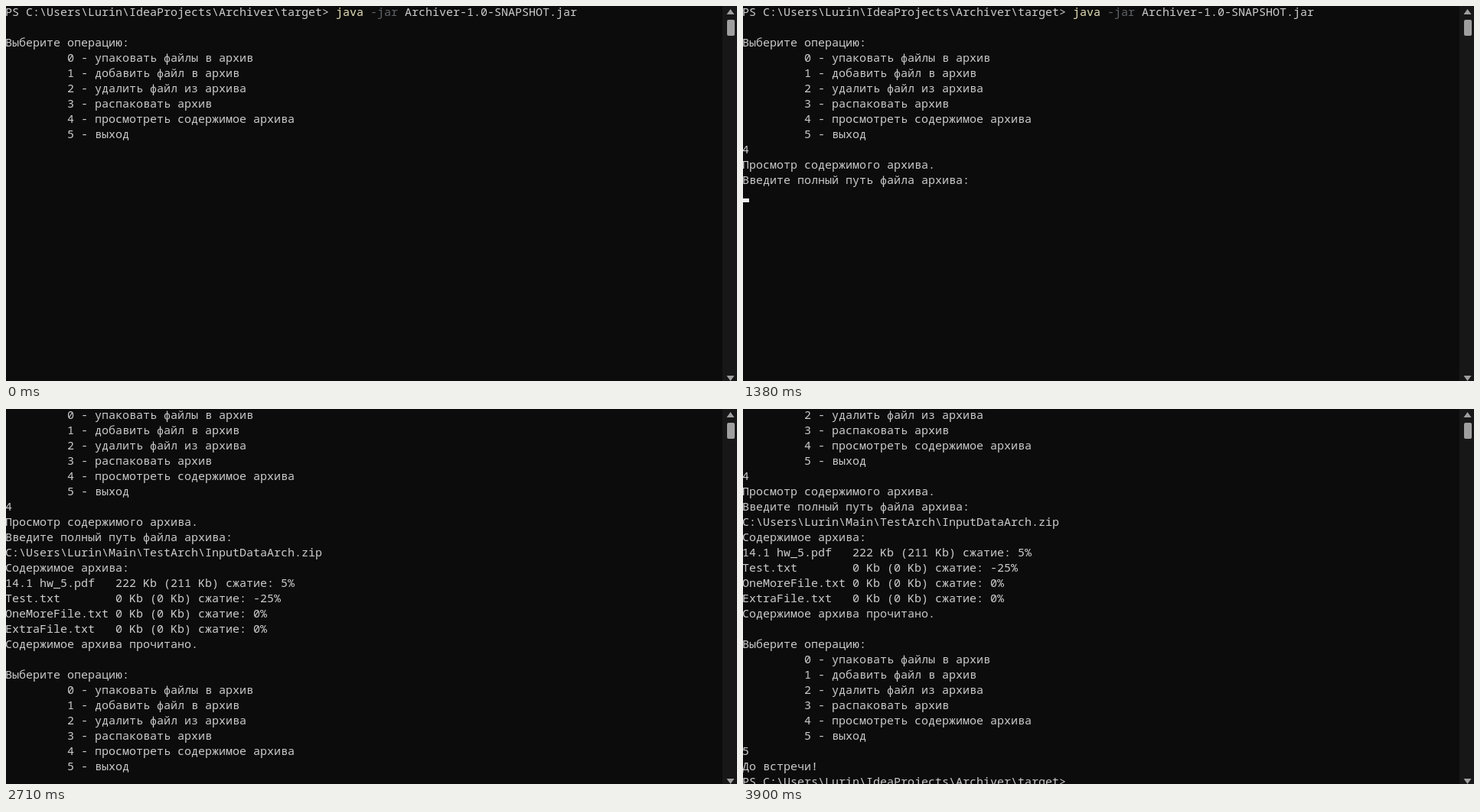
These frames come from a looping animation (955x491 px, 4.57 s). An HTML page:

```html
<!DOCTYPE html>
<html lang="ru">
<head>
<meta charset="utf-8">
<style>
  html, body { margin: 0; width: 100%; height: 100%; overflow: hidden; background: #0c0c0c; }
  svg { display: block; }
  text { font: 15px "Noto Sans Mono", "DejaVu Sans Mono", monospace; fill: #ccc; white-space: pre; }
  .command { fill: #e6e0b8; }
  .option { fill: #5f6468; }
</style>
</head>
<body>
<svg width="955" height="491" viewBox="0 0 955 491">
  <rect width="955" height="491" fill="#0c0c0c"/>
  <g id="screen"></g>
  <rect id="cursor" width="8" height="5" fill="#f2f2f2"/>
  <rect x="936" width="19" height="491" fill="#171717"/>
  <g fill="#9f9f9f">
    <rect x="942" y="18" width="10" height="21" rx="2"/>
    <path d="M946.5 4L951.5 11H941.5Z"/>
    <path d="M941.5 484H951.5L946.5 491Z"/>
  </g>
</svg>
<script>
const LOOP = 4570, COL = 9, ROW = 20, LEFT = -1, BASELINE = 13;
const prompt = 'PS C:\\Users\\Lurin\\IdeaProjects\\Archiver\\target>';
const menu = [
  '', 'Выберите операцию:',
  ...['упаковать файлы в архив', 'добавить файл в архив', 'удалить файл из архива',
    'распаковать архив', 'просмотреть содержимое архива', 'выход']
    .map((label, i) => ' '.repeat(9) + i + ' - ' + label)
];
const files = [
  ['14.1 hw_5.pdf', 222, 211, 5],
  ['Test.txt', 0, 0, -25],
  ['OneMoreFile.txt', 0, 0, 0],
  ['ExtraFile.txt', 0, 0, 0]
].map(([name, size, packed, ratio]) =>
  `${name.padEnd(16)}${size} Kb (${packed} Kb) сжатие: ${ratio}%`);

const lines = [
  [[prompt + ' '], ['java ', 'command'], ['-jar ', 'option'], ['Archiver-1.0-SNAPSHOT.jar']],
  ...menu,
  '4', 'Просмотр содержимого архива.', 'Введите полный путь файла архива:',
  'C:\\Users\\Lurin\\Main\\TestArch\\InputDataArch.zip',
  'Содержимое архива:', ...files, 'Содержимое архива прочитано.',
  ...menu,
  '5', 'До встречи!', prompt
];

// start time, visible line count, scrolled lines, cursor [column, line]
const states = [
  { at: 0, count: 9, scroll: 0 },
  { at: 710, count: 10, scroll: 0, cursor: [1, 9] },
  { at: 850, count: 10, scroll: 0 },
  { at: 1380, count: 12, scroll: 0, cursor: [0, 12] },
  { at: 2040, count: 13, scroll: 0, cursor: [46, 12] },
  { at: 2240, count: 13, scroll: 0 },
  { at: 2710, count: 27, scroll: 3 },
  { at: 3370, count: 28, scroll: 3 },
  { at: 3900, count: 30, scroll: 5 }
];

const screen = document.getElementById('screen');
const cursor = document.getElementById('cursor');
const svg = (tag, parent) =>
  parent.appendChild(document.createElementNS('http://www.w3.org/2000/svg', tag));

const rows = lines.map((line, i) => {
  const row = svg('text', screen);
  row.setAttribute('x', LEFT);
  row.setAttribute('y', i * ROW + BASELINE);
  for (const [content, style = ''] of Array.isArray(line) ? line : [[line]]) {
    const span = svg('tspan', row);
    span.textContent = content;
    span.setAttribute('class', style);
  }
  return row;
});

let current;
function render(time) {
  const state = states.findLast(s => s.at <= time % LOOP);
  if (state === current) return;
  current = state;
  screen.setAttribute('transform', `translate(0 ${-state.scroll * ROW})`);
  rows.forEach((row, i) => {
    row.style.display = i >= state.scroll && i < state.count ? '' : 'none';
  });
  cursor.style.display = state.cursor ? '' : 'none';
  if (state.cursor) {
    const [col, line] = state.cursor;
    cursor.setAttribute('x', Math.max(0, LEFT + col * COL));
    cursor.setAttribute('y', (line - state.scroll) * ROW + 12);
  }
}

const start = performance.now();
function tick() {
  render(performance.now() - start);
  requestAnimationFrame(tick);
}
tick();
</script>
</body>
</html>
```
